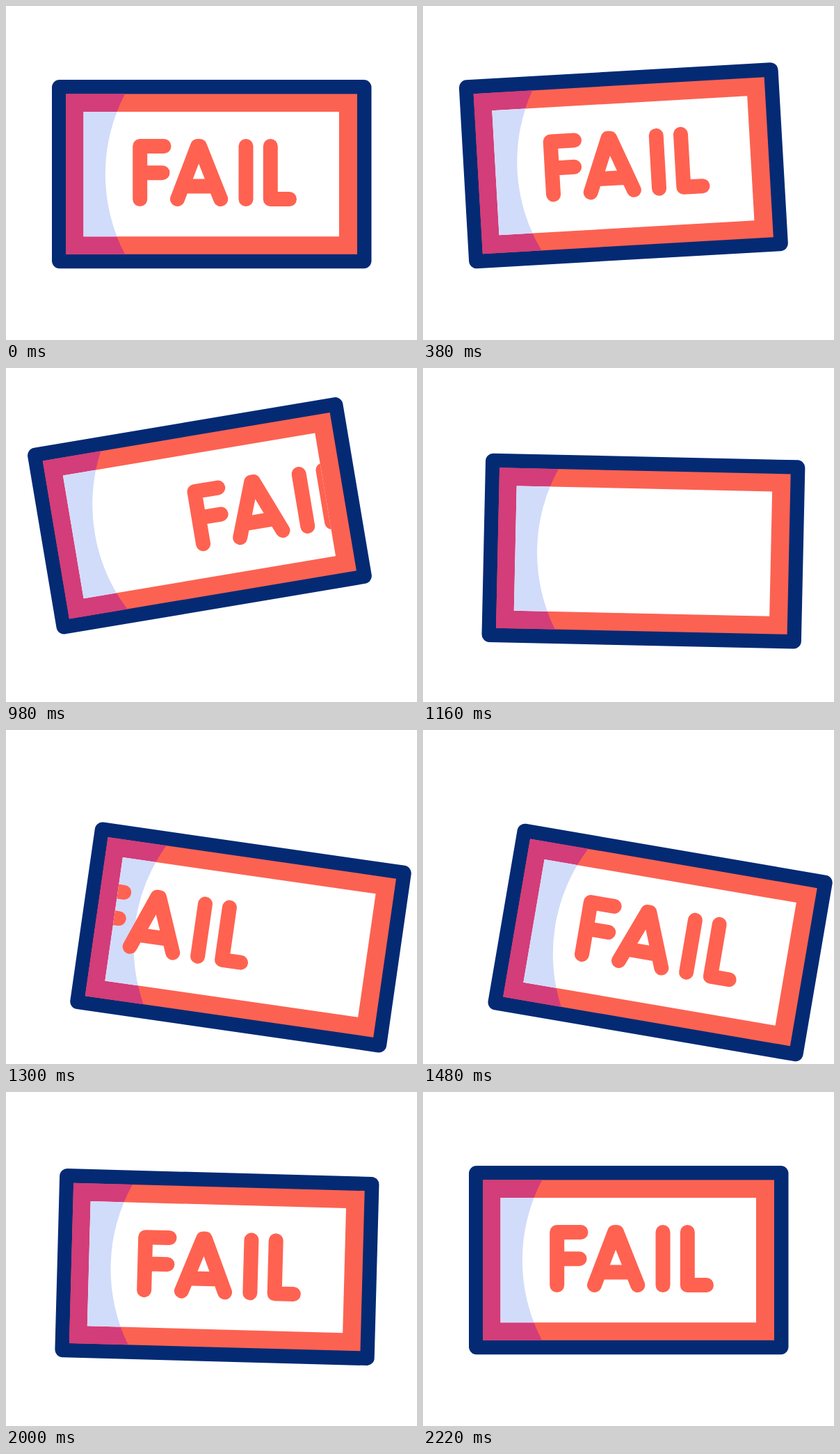
Animation of 591 by 480 pixels, one loop 2400 ms. Source, as an HTML page:

```html
<!DOCTYPE html>
<html lang="en">
<head>
<meta charset="utf-8">
<title>Fail stamp</title>
<style>
  html, body { margin: 0; width: 100%; height: 100%; overflow: hidden; background: #fff; }
  svg { display: block; width: 591px; height: 480px; }
  .navy { fill: #042a74; }
  .frame { fill: #fc6252; }
  .frame-shade { fill: #d33d79; }
  .paper { fill: #fff; }
  .paper-shade { fill: #d1dcfa; }
  .word { fill: none; stroke: #ff6251; stroke-width: 21; stroke-linecap: round; stroke-linejoin: round; }
</style>
</head>
<body>
<svg viewBox="0 0 591 480" role="img" aria-label="FAIL">
  <defs>
    <clipPath id="window"><rect x="111.5" y="152" width="367.5" height="179.3"/></clipPath>
    <path id="shade" d="M86.3 126.4H171A250 250 0 0 0 171 356.8H86.3Z"/>
  </defs>
  <g id="sign">
    <rect class="navy" x="66" y="106" width="459.5" height="271.3" rx="11"/>
    <rect class="frame" x="86.3" y="126.4" width="418.7" height="230.4"/>
    <use class="frame-shade" href="#shade"/>
    <g clip-path="url(#window)">
      <rect class="paper" x="111" y="151" width="369" height="181"/>
      <use class="paper-shade" href="#shade"/>
      <g id="word" class="word">
        <path d="M227 201.5H192.7V277.5M192.7 239.7H225"/>
        <path d="M246.5 277.5L275.5 201.5H278.5L308.7 277.5M254 259H301"/>
        <path d="M345 201.5V277.5"/>
        <path d="M380.3 201.5V277.5H407.5"/>
      </g>
    </g>
  </g>
</svg>
<script>
  const LOOP = 2400;
  const PIVOT = '75 365';

  // Rows: time, then values; every step eases in and out.
  const SIGN = [ // time, angle, x, y
    [200, 0, 0, 0],
    [800, -15, 0, 0],
    [1400, 10, 28.5, 25.5],
    [2200, 0, 0, 0]
  ];
  const WORD_OUT = [ // time, x, y
    [800, 0, 0],
    [1400, 465, 22]
  ];
  const WORD_IN = [
    [1080, -450, 0],
    [1400, -5.2, 0],
    [2200, 0, 0]
  ];
  const SWAP = 1170;

  const ease = u => u * u * (3 - 2 * u);

  function sample(rows, t) {
    const next = rows.findIndex(row => row[0] > t);
    if (next === 0) return rows[0].slice(1);
    if (next < 0) return rows[rows.length - 1].slice(1);
    const a = rows[next - 1], b = rows[next];
    const k = ease((t - a[0]) / (b[0] - a[0]));
    return a.slice(1).map((v, i) => v + (b[i + 1] - v) * k);
  }

  const sign = document.getElementById('sign');
  const word = document.getElementById('word');

  function draw(now) {
    const t = now % LOOP;
    const [angle, x, y] = sample(SIGN, t);
    const [wx, wy] = sample(t < SWAP ? WORD_OUT : WORD_IN, t);
    sign.setAttribute('transform', `translate(${x} ${y}) rotate(${angle} ${PIVOT})`);
    word.setAttribute('transform', `translate(${wx} ${wy})`);
  }

  const start = performance.now();
  function tick() {
    draw(performance.now() - start);
    requestAnimationFrame(tick);
  }
  tick();
</script>
</body>
</html>
```
